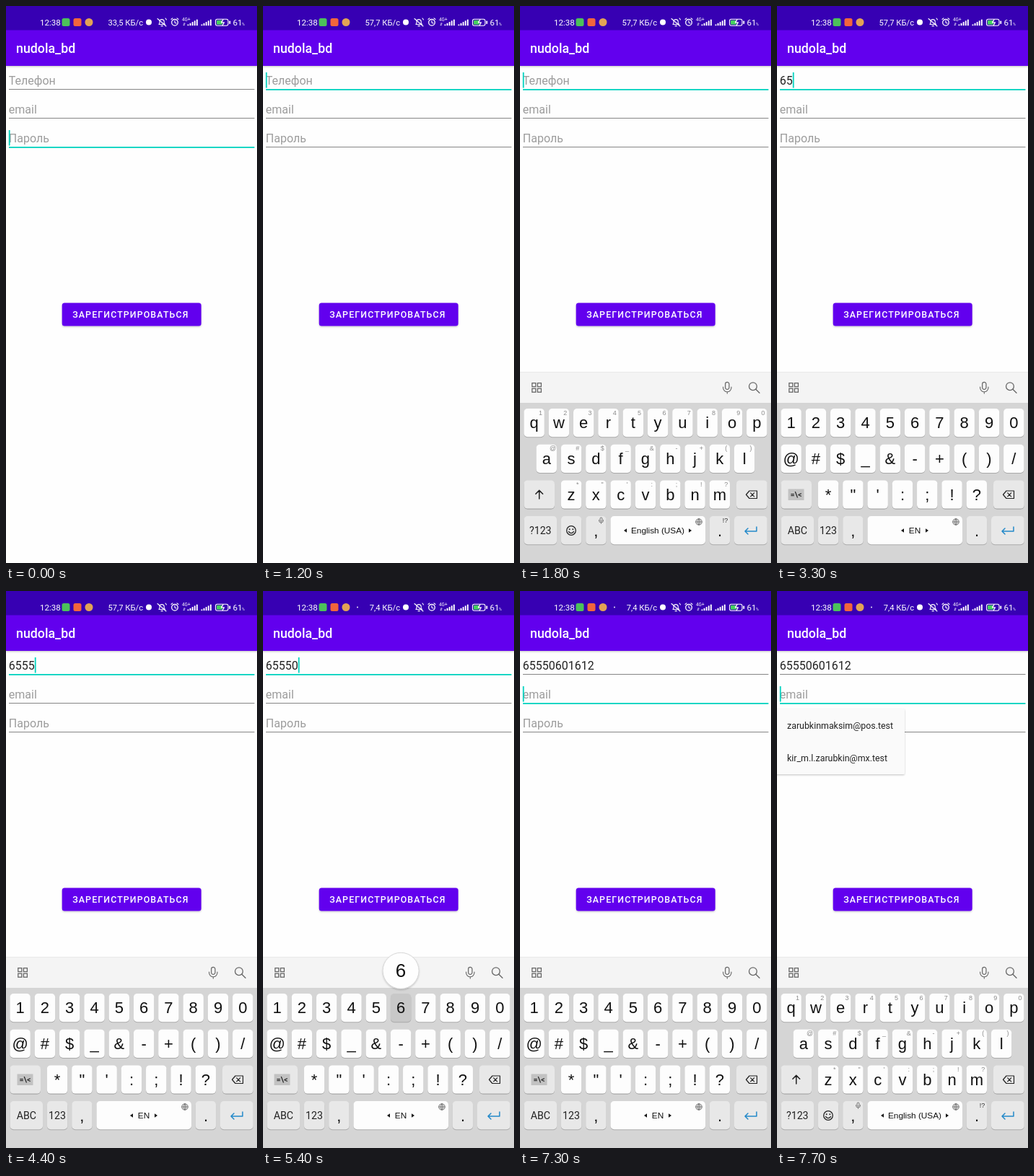
An HTML page for the animation above (8 s loop, 348 by 772 pixels).

```html
<!DOCTYPE html>
<html lang="ru">
<head>
<meta charset="utf-8">
<style>
  html, body { margin: 0; width: 100%; height: 100%; overflow: hidden; background: #fefefe; }
  svg { display: block; width: 348px; height: 772px; font-family: Roboto, sans-serif; }
  .key { font-family: "Liberation Sans", Arial, sans-serif; }
  .line { fill: none; stroke-linecap: round; stroke-linejoin: round; }
  .mid { text-anchor: middle; }
</style>
</head>
<body>
<svg id="stage" viewBox="0 0 348 772"></svg>
<script>
const LOOP = 8000, STEP = 100;
const PHONE = "65550601612";
const TEAL = "#03d2bf";
// One entry per digit: press time, time held down, time the bubble stays.
const TAPS = [
  [3000, 0, 100], [3200, 0, 100], [3500, 0, 100], [4200, 100, 200],
  [5000, 100, 100], [5400, 100, 200], [5700, 100, 100], [6000, 100, 200],
  [6400, 100, 200], [6700, 100, 200], [7000, 100, 200],
];
const FIELDS = ["Телефон", "email", "Пароль"];
const DIGITS = "1234567890";
const PITCH = 34.3, FIRST = 19.6, ROWS = [558, 607.7, 657.4, 707];

const esc = s => s.replace(/&/g, "&amp;").replace(/</g, "&lt;");
const text = (x, y, s, size, fill, attrs = "") =>
  `<text x="${x}" y="${y}" font-size="${size}" fill="${fill}" ${attrs}>${esc(s)}</text>`;
const rect = (x, y, w, h, fill, r = 0, attrs = "") =>
  `<rect x="${x}" y="${y}" width="${w}" height="${h}" rx="${r}" fill="${fill}" ${attrs}/>`;
const circle = (x, y, r, fill, attrs = "") =>
  `<circle cx="${x}" cy="${y}" r="${r}" fill="${fill}" ${attrs}/>`;
const line = (d, color, width = 1.2) =>
  `<path class="line" d="${d}" stroke="${color}" stroke-width="${width}"/>`;
const group = (id, body) => `<g id="${id}">${body}</g>`;

function bars(x, count) {
  return Array.from({ length: count }, (_, i) =>
    rect(x + i * 3.1, 25.5 - i * 1.7, 1.9, 1.7 + i * 1.7, "#fff")).join("");
}

function statusBar() {
  return rect(0, 0, 348, 33.5, "#3700b3")
    + text(47, 27, "12:38", 11.6, "#fff")
    + rect(77.5, 17, 11, 11, "#4cc25a", 2.5)
    + rect(93.5, 17, 11, 11, "#f2653c", 2.5)
    + circle(115, 22.5, 5.5, "#e2a355")
    + circle(131, 22.5, 0.9, "#fff", 'id="dot"')
    + text(190, 27, "", 11.2, "#fff", 'id="speed" text-anchor="end"')
    + circle(198, 22.5, 4, "#fff")
    + line("M212 25.5h8.5l-1.3-2v-2.5a3.2 3.2 0 0 0-6.2 0v2.5zM215 27.6h2.4M210 17.5l12 10.5M221 17l1.5 2", "#fff", 1.1)
    + circle(234, 22.8, 4.3, "none", 'stroke="#fff" stroke-width="1.3"')
    + line("M234 20.5v2.6l2 1M229 18.5l2-1.7M239 18.5l-2-1.7", "#fff", 1.1)
    + text(244, 21, "4G+", 6.4, "#fff")
    + text(245, 27, "⇵", 5, "#fff")
    + bars(251.5, 5) + bars(270.5, 5)
    + rect(290.5, 18.2, 17.5, 9, "none", 2.5, 'stroke="#fff" stroke-width="1.1"')
    + rect(292, 19.7, 8, 6, "#45d060", 1)
    + line("M301 18.8l-2.5 4h4l-2.3 4", "#fff", 1.3)
    + rect(309.4, 20.5, 1.8, 4.5, "#fff", 0.8)
    + text(314.5, 27, "61", 11.6, "#fff") + text(327, 27, "%", 5.6, "#fff");
}

function page() {
  const fields = FIELDS.map((hint, i) =>
    text(3.8, 109 + 40 * i, hint, 16, "#9c9c9c", `id="label${i}"`)
    + rect(4, 115 + 40 * i, 340.5, 1, "#858585", 0, `id="rule${i}"`)).join("");
  return rect(0, 33, 348, 50, "#6200ee", 0, 'filter="url(#soft)"')
    + statusBar()
    + text(14, 65, "nudola_bd", 17.8, "#fff", 'font-weight="500"')
    + fields
    + rect(0, 92, 1.8, 21.5, TEAL, 0, 'id="cursor"')
    + rect(77.7, 411.5, 193, 32, "#6200ee", 3.5, 'filter="url(#soft)"')
    + text(92.2, 432.3, "ЗАРЕГИСТРИРОВАТЬСЯ", 12.4, "#fff", 'font-weight="500" letter-spacing="1.1"')
    + group("menu", rect(-4, 163, 181, 91, "#fafafa", 2, 'filter="url(#soft)"')
      + text(14, 190.5, "zarubkinmaksim@pos.test", 12.4, "#222")
      + text(14, 235.5, "kir_m.l.zarubkin@mx.test", 12.4, "#222"));
}

const cap = (x, y, w, fill = "#fdfdfd", id = "") =>
  rect(x, y + 1.1, w, 39.2, "#a9a9a9", 5) + rect(x, y, w, 39.2, fill, 5, id && `id="${id}"`);

// A row of equal keys with optional small corner marks.
function keyRow(chars, row, start, marks = "", id = "") {
  return [...chars].map((ch, i) => {
    const x = FIRST + (start + i) * PITCH, y = ROWS[row];
    return cap(x - 14.2, y, 28.4, "#fdfdfd", id && id + ch)
      + text(x, y + 27.3, ch, 22, "#111", 'class="key mid"')
      + (marks ? text(x + 8.8, y + 8.6, marks[i], 9, "#8a8a8a", 'class="key mid"') : "");
  }).join("");
}

function bottomRow(mode, alt, lang, half) {
  const y = ROWS[3], arrow = (x, d) => `<path d="M${x} 724.3v5.4l${d}-2.7z" fill="#111"/>`;
  return cap(5.5, y, 45.6, "#e8e8e8", "mode" + mode.length) + text(28.3, 732, mode, 14.2, "#222", 'class="mid"')
    + cap(56.9, y, 28.4, "#e8e8e8") + alt
    + cap(91.2, y, 28.4, "#e8e8e8") + text(105.4, 735, ",", 22, "#111", 'class="key mid"')
    + cap(125.5, y, 131.5) + text(191, 731.3, lang, 11.8, "#111", 'class="key mid"')
    + arrow(191 - half, -4) + arrow(191 + half, 4)
    + circle(248, 715, 4.2, "none", 'stroke="#555" stroke-width=".9"')
    + line("M244 715h8M248 711v8M248 711q-4 4 0 8q4-4 0-8", "#555", 0.7)
    + cap(262.7, y, 28.4, "#e8e8e8") + text(277, 735, ".", 22, "#111", 'class="key mid"')
    + cap(297, y, 45.8, "#e8e8e8")
    + line("M328 722v6h-16M316 724l-4 4l4 4", "#2389c9", 1.5);
}

function keyboard() {
  const ink = "#686868";
  const smiley = circle(71, 727, 6.3, "none", 'stroke="#222" stroke-width="1.3"')
    + circle(68.7, 725.3, 1, "#222") + circle(73.3, 725.3, 1, "#222")
    + line("M67.5 728.5q3.5 4.2 7 0", "#222");
  const mic = (x, y, s, color) => `<g transform="translate(${x} ${y}) scale(${s})">`
    + rect(-2.8, -8, 5.6, 10.5, "none", 2.8, `stroke="${color}" stroke-width="1.3"`)
    + line("M-6-1v1a6 6 0 0 0 12 0v-1M0 6.2v2.3", color) + "</g>";
  const grid = [[16.8, 522.6], [24.4, 522.6], [16.8, 530.2], [24.4, 530.2]].map(([x, y]) =>
    rect(x, y, 5, 5, "none", 0, `stroke="${ink}" stroke-width="1.3"`)).join("");

  return rect(0, 507, 348, 265, "#d5d5d5") + rect(0, 507, 348, 43, "#f4f4f4") + rect(0, 507, 348, 0.8, "#e6e6e6")
    + grid + mic(287.3, 529, 0.95, ink)
    + circle(323, 527.2, 5.4, "none", `stroke="${ink}" stroke-width="1.3"`)
    + line("M327 531.3l5 5", ink, 1.4)
    + cap(5.5, ROWS[2], 42.5, "#e8e8e8") + cap(300, ROWS[2], 42.8, "#e8e8e8")
    + line("M318 672h10.5v10.5h-10.5l-4.5-5.25zM319.7 674.8l5 5m0-5l-5 5", "#222")
    + group("letters", keyRow("qwertyuiop", 0, 0, DIGITS)
      + keyRow("asdfghjkl", 1, 0.5, "@#$_&-+()")
      + keyRow("zxcvbnm", 2, 1.5, "*\"':;!?")
      + line("M26.7 683v-11.5M21.8 676.3l4.9-4.9l4.9 4.9", "#222", 1.5)
      + bottomRow("?123", smiley, "English (USA)", 43)
      + mic(112.5, 713, 0.5, "#333")
      + text(284.5, 716, "!?", 9, "#333", 'class="key mid"'))
    + group("symbols", keyRow(DIGITS, 0, 0, "", "digit")
      + keyRow("@#$_&-+()/", 1, 0)
      + keyRow("*\"':;!?", 2, 1.5)
      + rect(15.5, 669.5, 22, 15.5, "#c2c2c2")
      + text(26.6, 681, "=\\<", 10.8, "#222", 'class="mid" font-weight="500"')
      + bottomRow("ABC", text(71, 732, "123", 14.2, "#222", 'class="mid"'), "EN", 15))
    + group("bubble", circle(0, 526.3, 25, "#fefefe", 'stroke="#d0d0d0" stroke-width=".8" filter="url(#soft)"')
      + text(0, 535.3, "", 26, "#111", 'id="bubbleText" class="key mid"'));
}

const stage = document.getElementById("stage");
stage.innerHTML = `<filter id="soft" x="-10%" y="-20%" width="120%" height="150%">
  <feDropShadow dx="0" dy="1.2" stdDeviation="1.2" flood-opacity=".22"/></filter>`
  + page() + group("keyboard", keyboard());

const $ = id => document.getElementById(id);
const set = (id, attrs) => { for (const name in attrs) $(id).setAttribute(name, attrs[name]); };
const show = (id, on) => set(id, { visibility: on ? "visible" : "hidden" });
const ramp = (t, from, length) => Math.min(1, Math.max(0, (t - from) / length));
const smooth = u => u * u * (3 - 2 * u);

// The caret blinks every half second, counted from the last edit.
function caretLit(t, lastTap) {
  if (t < 1200) return t < 800;
  if (t >= 7300) return true;
  const edit = lastTap ? lastTap[0] + lastTap[1] : t >= 1600 ? 1600 : 1200;
  return (t - edit) % 1000 < 500;
}

function draw(t) {
  const typed = TAPS.filter(([down, held]) => t >= down + held);
  const focus = t < 1200 ? 2 : t < 7300 ? 0 : 1;

  $("speed").textContent = (t < 500 ? "33,5" : t < 5000 ? "57,7" : "7,4") + " КБ/с";
  show("dot", t >= 5000);

  FIELDS.forEach((_, i) => set("rule" + i, focus === i
    ? { fill: TEAL, height: 1.8 }
    : { fill: "#858585", height: 1 }));
  $("label0").textContent = PHONE.slice(0, typed.length) || FIELDS[0];
  set("label0", { fill: typed.length ? "#222" : "#9c9c9c" });

  show("cursor", caretLit(t, typed.at(-1)));
  set("cursor", { x: 3.8 + (focus ? 0 : typed.length * 9), y: 92 + 40 * focus });

  const rise = smooth(ramp(t, 1380, 420));
  set("keyboard", { transform: `translate(0 ${265 * (1 - rise)})`, opacity: rise });
  const symbols = t >= 2100 && t < 7400;
  show("symbols", symbols);
  show("letters", !symbols);
  set("mode4", { fill: t === 2000 ? "#c8c8c8" : "#e8e8e8" });

  const now = TAPS.findIndex(([down, , shown]) => t >= down && t < down + shown);
  show("bubble", now >= 0);
  for (const d of DIGITS) set("digit" + d, { fill: "#fdfdfd" });
  if (now >= 0) {
    const digit = PHONE[now], [down, held] = TAPS[now];
    set("bubble", { transform: `translate(${FIRST + DIGITS.indexOf(digit) * PITCH} 0)` });
    $("bubbleText").textContent = digit;
    if (t < down + held) set("digit" + digit, { fill: "#c8c8c8" });
  }

  set("menu", { opacity: ramp(t, 7400, 300) });
}

function tick() {
  draw(Math.floor(performance.now() % LOOP / STEP) * STEP);
  requestAnimationFrame(tick);
}
tick();
</script>
</body>
</html>
```
